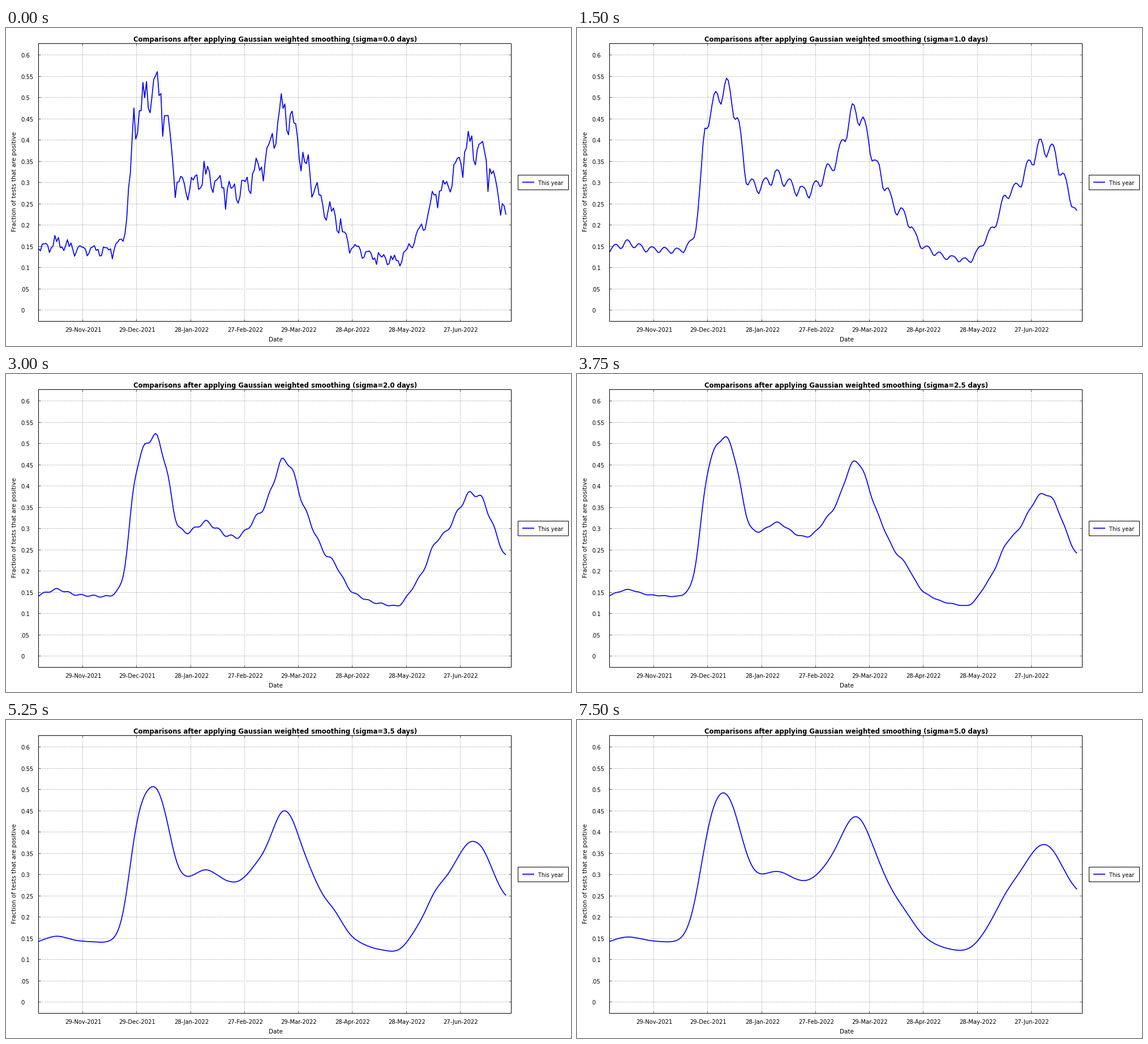
A matplotlib script that plays this animation: 998x561 px, repeating every 8000 ms.

```python
import numpy as np
import matplotlib.pyplot as plt
from matplotlib.animation import FuncAnimation

W, H, DPI = 998, 561, 100
PX = 72 / DPI                      # points per pixel
LEFT, RIGHT, TOP, BOTTOM = 57.5, 892.5, 27.5, 517.5
DAY = 3.1747                       # pixels per day
FIRST_X = 57.7
LEAD, LAST = 15, 260               # days before and after the left edge
STEP_MS, HOLD, FRAMES = 250, 3, 32

plt.rcParams["font.family"] = "DejaVu Sans"

# Turning points of the underlying trend: day, positive fraction
TREND = [
    (-15, .118), (10, .159), (20, .144), (40, .139), (47, .165), (50, .265),
    (53, .435), (58, .490), (66, .530), (72, .430), (76, .303), (83, .287),
    (93, .320), (104, .283), (112, .278), (127, .358), (135, .470),
    (140, .456), (147, .355), (159, .237), (164, .227), (173, .152),
    (185, .127), (201, .115), (215, .205), (220, .270), (227, .290),
    (239, .387), (247, .375), (260, .223),
]


def daily_series():
    """Trend, with a sharp weekly dip and day-to-day scatter on top."""
    days = np.arange(-LEAD, LAST + 1)
    trend = np.interp(days, *zip(*TREND))
    dip_day = 6.4 - 0.006 * days
    angle = 2 * np.pi * (days - dip_day) / 7
    weekly = -0.075 * (np.cos(angle) + 0.4 * np.cos(2 * angle))
    rng = np.random.default_rng(4)
    scatter = np.diff(rng.normal(0, 0.012, len(days) + 2), n=2)
    return days, trend * (1 + weekly + scatter)


def smooth(sigma):
    if sigma == 0:
        return RAW[LEAD:]
    gap = DAYS[LEAD:, None] - DAYS[None, :]
    weight = np.exp(-gap**2 / (2 * sigma**2))
    return weight @ RAW / weight.sum(axis=1)


def y_of(value):
    return 497.5 - 750 * value


DAYS, RAW = daily_series()

fig = plt.figure(figsize=(W / DPI, H / DPI), dpi=DPI, facecolor="white")
ax = fig.add_axes([0, 0, 1, 1])
ax.set_xlim(0, W)
ax.set_ylim(H, 0)
ax.axis("off")


def text(x, y, s, size=10, **kw):
    kw = {"ha": "left", "va": "baseline", "color": "black", **kw}
    return ax.text(x, y, s, fontsize=size * PX, **kw)


def line(xs, ys, color="black", width=1, **kw):
    kw = {"solid_capstyle": "butt", "snap": False, **kw}
    return ax.plot(xs, ys, color=color, lw=width * PX, **kw)[0]


def box(x0, y0, x1, y1):
    line((x0, x1, x1, x0, x0), (y0, y0, y1, y1, y0), zorder=4,
         solid_capstyle="projecting", solid_joinstyle="miter")


def grid(xs, ys):
    line(xs, ys, "#808080", dashes=(1, 2), dash_capstyle="butt", zorder=1)


def tick(xs, ys):
    line(xs, ys, "#606060")


for i in range(13):
    y = y_of(i * 0.05)
    y = np.floor(y + 1e-6) + 0.5
    grid((58, 892), (y, y))
    tick((LEFT, LEFT + 4), (y, y))
    tick((RIGHT - 4, RIGHT), (y, y))
    label = ".05" if i == 1 else f"{i * 0.05:.2f}".rstrip("0").rstrip(".")
    text(26, y + 4, label)

dates = ["29-Nov-2021", "29-Dec-2021", "28-Jan-2022", "27-Feb-2022",
         "29-Mar-2022", "28-Apr-2022", "28-May-2022", "27-Jun-2022"]
for i, date in enumerate(dates):
    x = np.floor(135.7 + 30 * DAY * i) + 0.5
    grid((x, x), (28, 517))
    tick((x, x), (BOTTOM - 4, BOTTOM))
    tick((x, x), (TOP, TOP + 4))
    text(x + 1, 536, date, ha="center")

box(LEFT, TOP, RIGHT, BOTTOM)
text(476, 553, "Date", 10.4, ha="center")
text(18, 270.5, "Fraction of tests that are positive", 10.5, ha="center",
     rotation=90, rotation_mode="anchor")

box(904.5, 259.5, 993.5, 285.5)
line((912, 933), (272, 272), "blue", 1.7)
text(940.5, 277, "This year", 9.6)

title = text(225, 24, "", 11.62, weight="bold")
curve = line(FIRST_X + DAY * DAYS[LEAD:], y_of(RAW[LEAD:]), "blue", 1.7,
             solid_joinstyle="round", zorder=3)


def update(frame):
    sigma = 0.5 * (frame // HOLD)
    curve.set_ydata(y_of(smooth(sigma)))
    title.set_text("Comparisons after applying Gaussian weighted smoothing "
                   f"(sigma={sigma:.1f} days)")
    return curve, title


anim = FuncAnimation(fig, update, frames=FRAMES, interval=STEP_MS,
                     repeat=True, repeat_delay=0)
plt.show()
```
